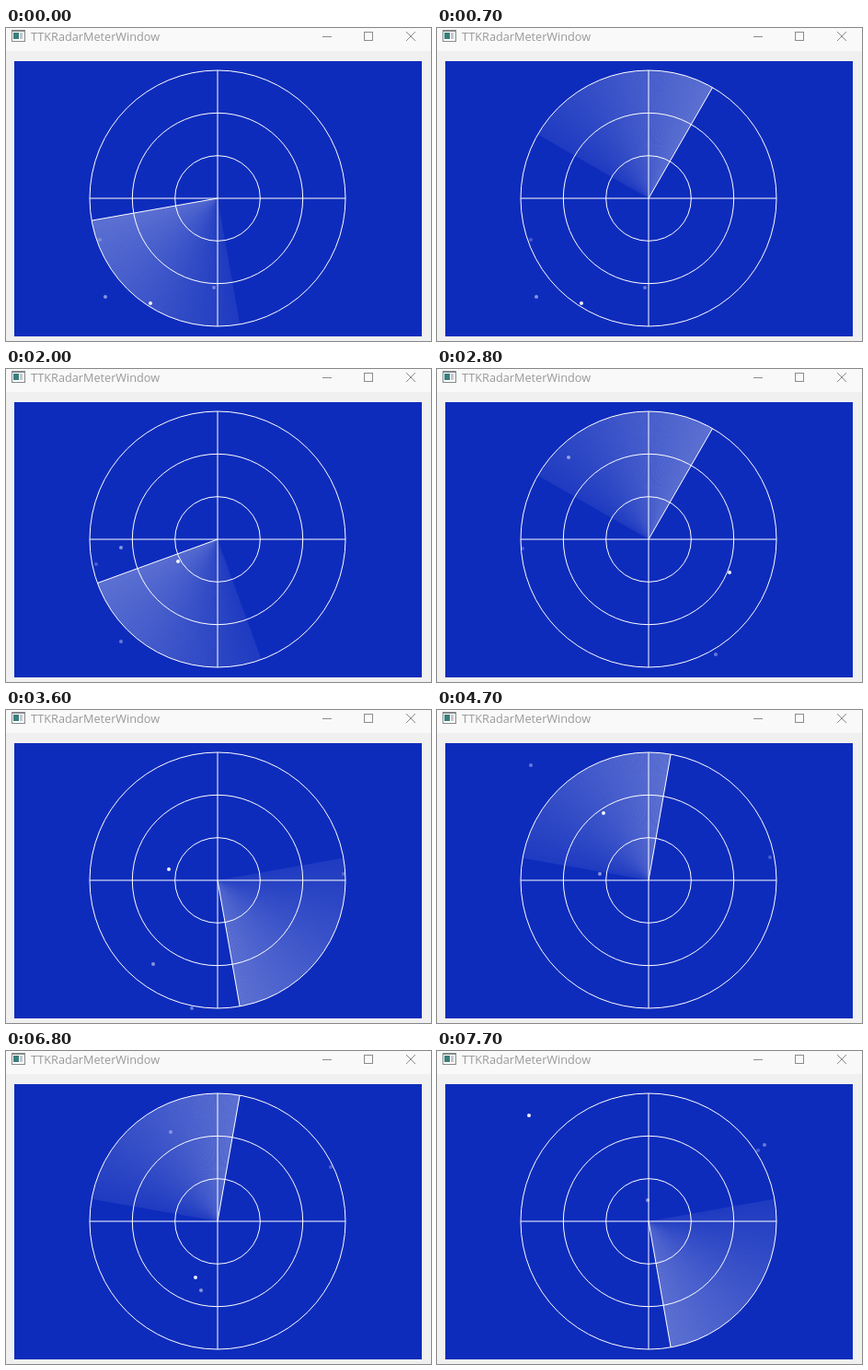
Recreate the animation shown at these times as an HTML page with a canvas. Size 462 by 340 pixels, loop 7800 ms.

```html
<!DOCTYPE html>
<html lang="en">
<head>
<meta charset="utf-8">
<title>TTKRadarMeterWindow</title>
<style>
  html, body { margin: 0; width: 100%; height: 100%; overflow: hidden; background: #f0f0f0; }
  canvas { display: block; width: 462px; height: 340px; }
</style>
</head>
<body>
<canvas id="stage" width="462" height="340"></canvas>
<script>
const ctx = document.getElementById('stage').getContext('2d');
const LOOP = 7800, STEP = 100;
const CX = 230, CY = 185, R = 139;
const TAIL = 90;

// The brightest blip of each scan; the faint ones around it are seeded.
const bright = [
  [157, 299], [187, 209], [318, 221], [177, 173],
  [181, 112], [369, 292], [206, 246], [100, 70]
];
const FAINT = 3;

const rad = deg => deg * Math.PI / 180;
const white = a => `rgba(255,255,255,${a})`;

function seeded(seed) {
  let s = seed * 7919 + 17;
  return () => (s = s * 16807 % 2147483647) / 2147483647;
}

function box(x, y, w, h, color) {
  ctx.fillStyle = color;
  ctx.fillRect(x, y, w, h);
}

function line(x1, y1, x2, y2) {
  ctx.beginPath();
  ctx.moveTo(x1, y1);
  ctx.lineTo(x2, y2);
  ctx.stroke();
}

function drawWindow() {
  box(0, 0, 462, 340, '#f0f0f0');
  box(0, 0, 462, 25, '#f9f9f9');

  box(6, 2, 15, 13, '#85898b');
  box(7, 4, 13, 10, '#ffffff');
  box(8, 5, 6, 7, '#397f7d');
  box(15, 5, 3, 7, '#c3c9ca');

  ctx.fillStyle = '#999999';
  ctx.font = '12.7px "Open Sans", "Noto Sans", sans-serif';
  ctx.textBaseline = 'alphabetic';
  ctx.fillText('TTKRadarMeterWindow', 27, 14);

  ctx.lineWidth = 1;
  ctx.strokeStyle = '#8c8c8c';
  line(344, 9.5, 354, 9.5);
  ctx.strokeRect(389.5, 4.5, 9, 9);
  line(435, 4, 445, 14);
  line(445, 4, 435, 14);

  box(9, 36, 443, 299, '#0e2cbc');
}

function drawSweep(angle) {
  for (let i = 0; i < TAIL; i++) {
    ctx.fillStyle = white(.33 - .26 * i / TAIL);
    ctx.beginPath();
    ctx.moveTo(CX, CY);
    ctx.arc(CX, CY, R, rad(-angle - i - 1), rad(-angle - i));
    ctx.fill();
  }
  ctx.strokeStyle = '#ffffff';
  line(CX, CY, CX + R * Math.cos(rad(angle)), CY - R * Math.sin(rad(angle)));
}

function drawGrid() {
  ctx.strokeStyle = '#ffffff';
  for (let i = 1; i <= 3; i++) {
    ctx.beginPath();
    ctx.arc(CX, CY, R * i / 3, 0, 2 * Math.PI);
    ctx.stroke();
  }
  line(CX - R, CY, CX + R, CY);
  line(CX, CY - R, CX, CY + R);
}

function blip(x, y, opacity) {
  ctx.fillStyle = white(opacity);
  ctx.beginPath();
  ctx.arc(x, y, 2, 0, 2 * Math.PI);
  ctx.fill();
}

function drawBlips(scan) {
  const rand = seeded(scan + 1);
  const spread = () => Math.round((rand() * 2 - 1) * R);
  blip(...bright[scan], .92);
  for (let i = 0; i < FAINT; i++) {
    blip(CX + spread(), CY + spread(), .5 - .13 * i);
  }
}

function render(time) {
  const n = Math.floor(time % LOOP / STEP);
  // The hand turns clockwise in 10 degree ticks, slightly faster than the repaint.
  const ticks = Math.floor(n * 1.746 + .98);
  const scan = Math.floor((n * STEP + 120) / 1105);
  drawWindow();
  drawSweep(190 - 10 * ticks);
  drawGrid();
  drawBlips(scan);
}

const start = performance.now();
function tick() {
  render(performance.now() - start);
  requestAnimationFrame(tick);
}
tick();
</script>
</body>
</html>
```
